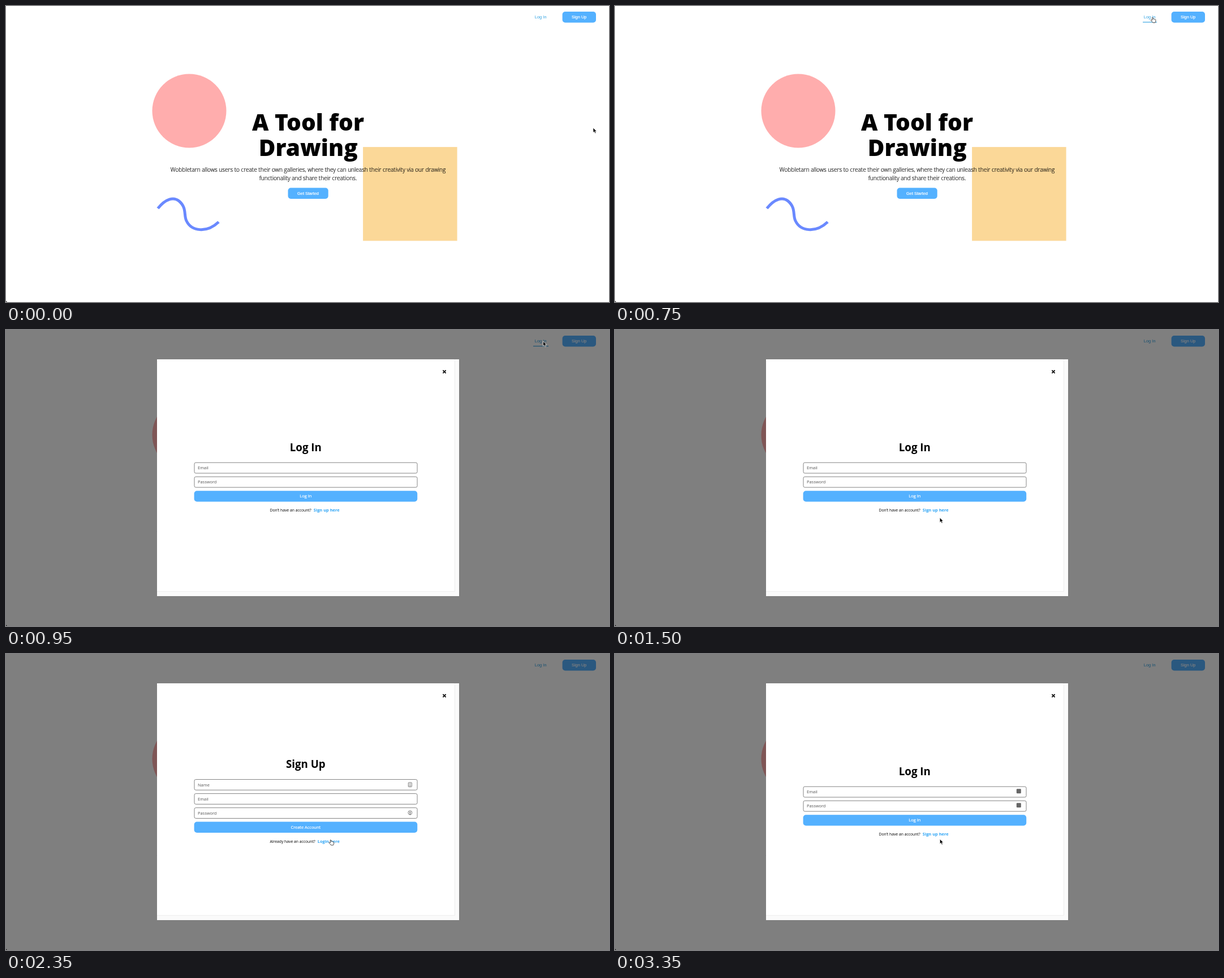
Recreate the animation shown at these times as an HTML page. Size 1066 by 525 pixels, loop 3850 ms.

```html
<!DOCTYPE html>
<html lang="en">
<head>
<meta charset="utf-8">
<title>Drawing tool sign-in</title>
<style>
html, body { margin: 0; width: 100%; height: 100%; overflow: hidden; background: #fff; }
svg { display: block; width: 100vw; height: 100vh; }
text { font-family: "Open Sans", sans-serif; text-anchor: middle; }
.ui { font: 7.45px "Liberation Sans", Arial, sans-serif; }
.title { font-size: 40.5px; font-weight: 800; }
.lead { font-size: 10.06px; font-weight: 300; stroke: #000; stroke-width: .18; }
.head { font-size: 18.7px; font-weight: 700; }
.small { font-size: 7.45px; }
.note { font-size: 6.8px; }
.left { text-anchor: start; }
.link { font-weight: 700; fill: #2ea5f5; }
.field { fill: #fff; stroke: #767676; stroke-width: .9; }
.btn { fill: #54b1ff; }
.white { fill: #fff; stroke: #fff; stroke-width: .2; }
</style>
</head>
<body>
<svg id="stage" viewBox="0 0 1066 525"></svg>
<script>
const LOOP = 3850, STEP = 50;
const stage = document.getElementById('stage');

const text = (cls, x, y, str, extra = '') => `<text class="${cls}" x="${x}" y="${y}" ${extra}>${str}</text>`;
const button = (x, y, w) => `<rect class="btn" x="${x}" y="${y}" width="${w}" height="19.3" rx="5"/>`;
const field = (y, label) =>
  `<rect class="field" x="333" y="${y}" width="394" height="18.8" rx="2.6"/>` + text('small left', 339, y + 12, label, 'fill="#555"');
const form = (id, y, title, labels, action, note, link, linkX) => {
  const end = y + 26.2 + labels.length * 25.1;
  return `<g id="${id}">` + text('head', 529.8, y + 6.2, title) +
    labels.map((label, i) => field(y + 26.4 + i * 25.1, label)).join('') +
    button(332.6, end, 394.6) + text('small white', 529.8, end + 12.2, action) +
    text('note left', 466.5, end + 37.2, note) +
    text('small left link', linkX, end + 37.2, link) + '</g>';
};
const tile = y => `<rect x="709.8" y="${y}" width="8" height="8" rx="1.2" fill="#666"/>`;

stage.innerHTML = `
  <rect width="1066" height="525" fill="#fff"/>
  <circle cx="324" cy="186" r="65.5" fill="#ffadad"/>
  <rect x="631.1" y="250.1" width="166.5" height="166.4" fill="#fbd898"/>
  <path d="M268.5 359C282 342 296 338 306 346C320 358 314 371 319 381C328 400 355 403 376 383"
    fill="none" stroke="#6a89ff" stroke-width="5"/>
  ${text('title', 534, 220.8, 'A Tool for')}
  ${text('title', 534.3, 266.3, 'Drawing', 'id="oldWord"')}
  ${text('title', 534, 266.3, 'Viewing', 'id="newWord"')}
  ${text('lead', 534, 293.5, 'Wobbletarn allows users to create their own galleries, where they can unleash their creativity via our drawing')}
  ${text('lead', 534, 308.6, 'functionality and share their creations.')}
  ${button(498.5, 322.6, 71.2)}${text('ui white', 534, 334.8, 'Get Started')}
  ${text('ui', 945.2, 22.4, 'Log In', 'fill="#2ea1e2"')}
  <rect id="underline" y="28.1" height="1.1" fill="#2ea1e2"/>
  ${button(983.6, 10.1, 59.4)}${text('ui white', 1013.2, 22.4, 'Sign Up')}
  <path d="M0 522.5Q.3 524.7 2.5 525H0Z"/>
  <g id="modal">
    <rect width="1066" height="525" fill="#000" opacity=".5"/>
    <rect x="267" y="52" width="534" height="420" fill="#fafafa"/>
    <path d="M267 52H793.3V463.7H267Z" fill="#fff"/>
    <path d="M793.3 52V463.7H267" fill="none" stroke="#e6e6e6" stroke-width=".7"/>
    <path d="M772.4 71.4l5.2 5.2m0-5.2l-5.2 5.2" stroke="#000" stroke-width="1.7"/>
    ${form('login', 208.8, 'Log In', ['Email', 'Password'], 'Log In', 'Don’t have an account?', 'Sign up here', 543.8)}
    ${form('signup', 196.1, 'Sign Up', ['Name', 'Email', 'Password'], 'Create Account', 'Already have an account?', 'Login here', 550.8)}
    <g id="loginIcons">${tile(239.2)}${tile(264.2)}</g>
    <g id="signupIcons" fill="none" stroke="#666" stroke-width=".9">
      <rect x="711.3" y="228" width="6" height="7.6" rx=".8"/>
      <circle cx="714.3" cy="230.7" r=".7"/><path d="M712.6 233.6h3.4"/>
      <circle cx="714.3" cy="281.4" r="3.4"/><circle cx="714.3" cy="280.9" r=".9"/><path d="M714.3 281.5v4.4"/>
    </g>
  </g>
  <g id="cursor" stroke="#fff" stroke-linejoin="round">
    <path id="arrow" d="M0 0V8.6L2 6.8L3.4 10L5 9.3L3.6 6.2H6.2Z" stroke-width=".7"/>
    <path id="hand" d="M0 .6C1-.2 1.6.6 1.8 1.6L2.2 3.2C3 2.7 3.7 3 3.9 3.6C4.6 3.2 5.2 3.5 5.4 4.1C6.2 3.9 6.5 4.4 6.5 5.2C6.5 7 6 8 5.4 9.6H1.3C.6 8-1.2 6.8-2.2 5.4C-2.3 4.4-1.2 4.2.4 5.2Z"
      fill="#fff" stroke="#000" stroke-width=".7"/>
  </g>`;

const el = Object.fromEntries([...stage.querySelectorAll('[id]')].map(node => [node.id, node]));
const clamp = v => Math.min(1, Math.max(0, v));
const smooth = p => p * p * (3 - 2 * p);
const easeOut = p => 1 - (1 - clamp(p)) ** 2.3;
const show = (node, on) => node.setAttribute('visibility', on ? 'inherit' : 'hidden');
const within = (t, a, b) => t >= a && t < b;

// Pointer stops: time, x, y
const stops = [
  [0, 1038, 216], [300, 531, 318], [550, 949.5, 20], [1000, 949.5, 20], [1450, 574, 335],
  [1650, 575, 321], [2150, 575, 321], [2400, 573, 330.4], [3050, 573, 330.4], [3350, 574.3, 328.2], [LOOP, 574.3, 328.2]
];
function pointer(t) {
  const i = stops.findIndex((stop, k) => k && t <= stop[0]);
  const [t0, x0, y0] = stops[i - 1], [t1, x1, y1] = stops[i];
  const p = smooth((t - t0) / (t1 - t0));
  return [x0 + (x1 - x0) * p, y0 + (y1 - y0) * p];
}

// Damped spring, stiffness 340 and damping 30
function spring(s) {
  if (s <= 0) return 0;
  const w = Math.sqrt(340 - 15 ** 2);
  return 1 - Math.exp(-15 * s) * (Math.cos(w * s) + 15 / w * Math.sin(w * s));
}

function word(node, shift, opacity) {
  node.setAttribute('transform', `translate(0 ${shift})`);
  node.setAttribute('opacity', clamp(opacity));
}

function render(t) {
  const swap = spring((t - 750) / 1000);
  word(el.oldWord, -45 * swap, 1 - swap);
  word(el.newWord, 45 * (1 - swap), swap);

  const line = 27 * (easeOut((t - 550) / 300) - easeOut((t - 1000) / 300));
  el.underline.setAttribute('x', 945.5 - line / 2);
  el.underline.setAttribute('width', Math.max(0, line));

  const signup = within(t, 1900, 2900);
  show(el.modal, t >= 950);
  show(el.login, !signup);
  show(el.signup, signup);
  show(el.loginIcons, within(t, 1750, 1900) || t >= 3100);
  show(el.signupIcons, within(t, 2300, 2900));

  const hand = within(t, 550, 950) || within(t, 1650, 1900) || within(t, 2350, 2850);
  show(el.hand, hand);
  show(el.arrow, !hand);
  el.cursor.setAttribute('transform', `translate(${pointer(t)})`);
}

const start = performance.now();
function tick() {
  const t = (performance.now() - start) % LOOP;
  render(Math.floor(t / STEP) * STEP);
  requestAnimationFrame(tick);
}
render(0);
tick();
</script>
</body>
</html>
```
